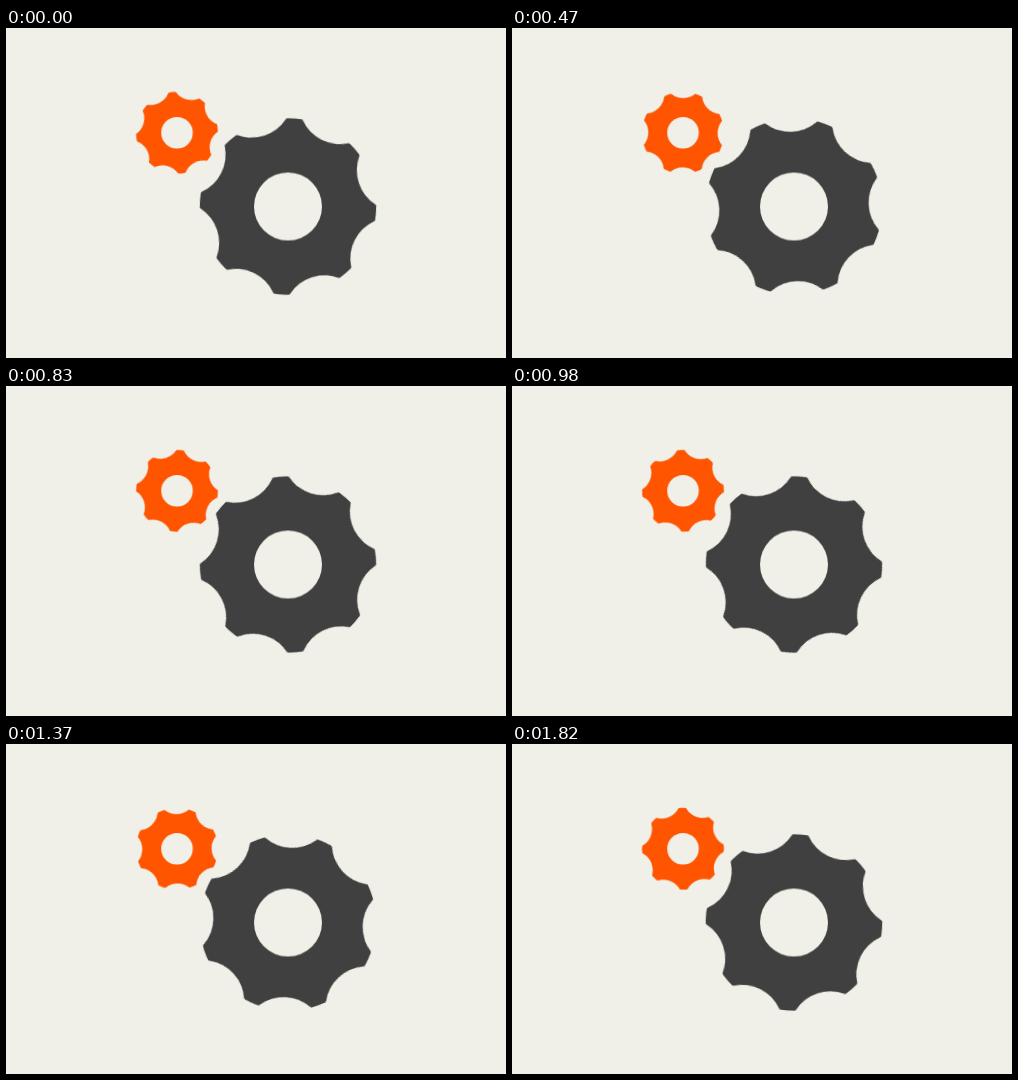
Write an HTML page that moves like this. It is 500 px wide and 330 px high and loops after 2120 ms.

```html
<!DOCTYPE html>
<html lang="en">
<head>
<meta charset="utf-8">
<title>Gears</title>
<style>
  html, body { margin: 0; width: 100%; height: 100%; overflow: hidden; background: #f0f0e8; }
  svg { display: block; width: 500px; height: 330px; }
  path { stroke-width: 4; stroke-linejoin: round; transform-origin: 0 0; animation: turn 2120ms infinite; }
  .large { --from: 4.2deg; --to: 94.2deg; fill: #404040; stroke: #404040; }
  .small { --from: -6.9deg; --to: -91deg; fill: #ff5500; stroke: #ff5500; }
  circle { fill: #f0f0e8; }

  /* rest 200 ms, 55 steps of 30 ms, rest until the loop ends */
  @keyframes turn {
    0% { transform: rotate(var(--from)); }
    9.43396% { transform: rotate(var(--from)); animation-timing-function: steps(55, jump-start); }
    87.26415%, 100% { transform: rotate(var(--to)); }
  }
</style>
</head>
<body>
<svg viewBox="0 0 500 330">
  <g transform="translate(282 178.5)">
    <path class="large"/>
    <circle r="34"/>
  </g>
  <g transform="translate(171 104.8) scale(.464)">
    <path class="small"/>
    <circle r="34"/>
  </g>
</svg>
<script>
  const TEETH = 8, TIP_RADIUS = 86.2, TIP_HALF_ANGLE = 4.5, VALLEY_ARC = 43;

  const point = degrees => {
    const a = degrees * Math.PI / 180;
    return `${(TIP_RADIUS * Math.sin(a)).toFixed(3)} ${(-TIP_RADIUS * Math.cos(a)).toFixed(3)}`;
  };

  // Each tooth is a short convex tip followed by a concave valley.
  let outline = `M${point(-TIP_HALF_ANGLE)}`;
  for (let i = 0; i < TEETH; i++) {
    const tooth = i * 360 / TEETH;
    const next = tooth + 360 / TEETH;
    outline += `A${TIP_RADIUS} ${TIP_RADIUS} 0 0 1 ${point(tooth + TIP_HALF_ANGLE)}`;
    outline += `A${VALLEY_ARC} ${VALLEY_ARC} 0 0 0 ${point(next - TIP_HALF_ANGLE)}`;
  }
  document.querySelectorAll('path').forEach(gear => gear.setAttribute('d', outline + 'Z'));
</script>
</body>
</html>
```
